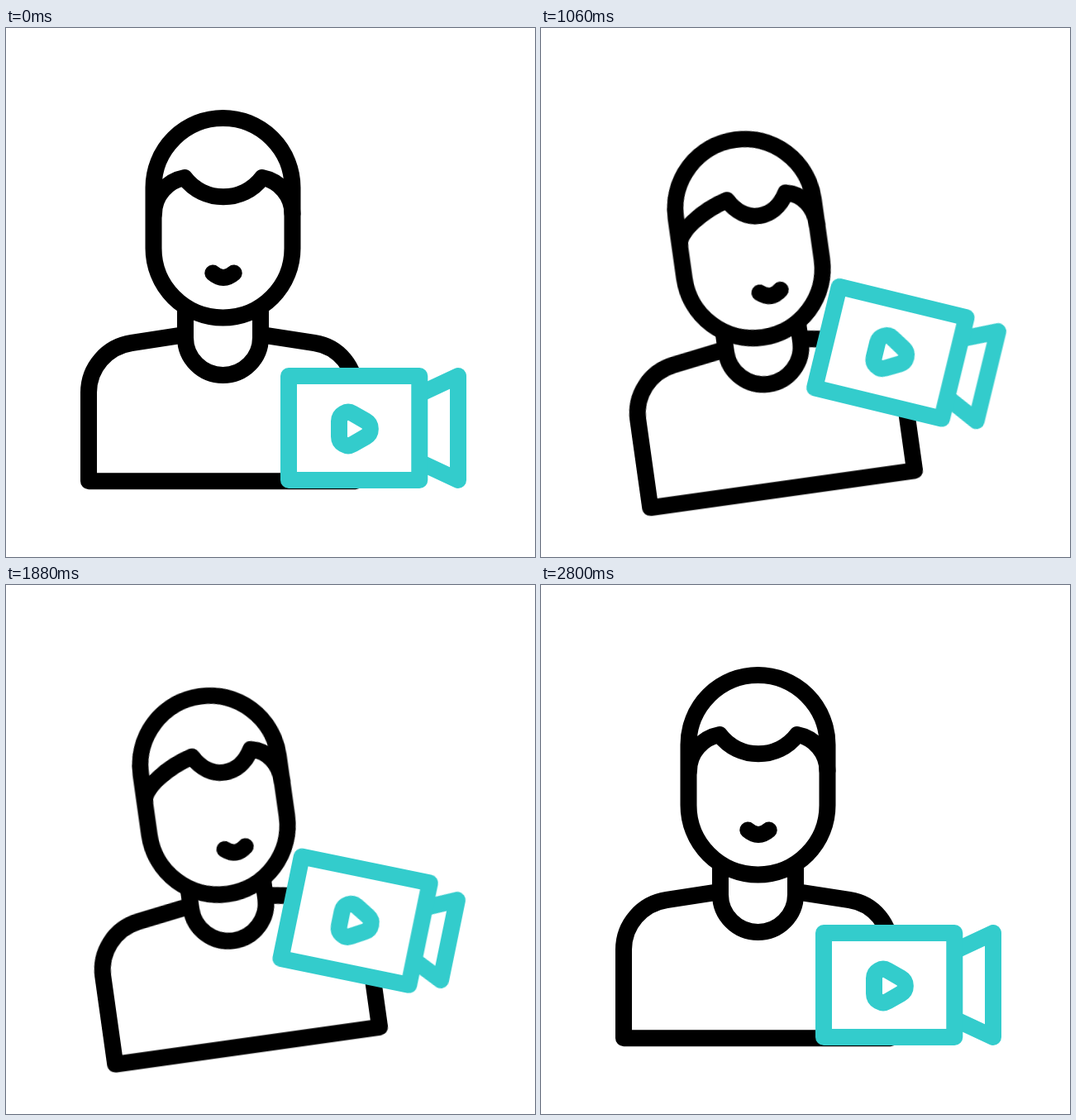
An HTML page for the animation above (2820 ms loop, 640 px wide and 640 px high).

```html
<!DOCTYPE html>
<html lang="en">
<head>
<meta charset="utf-8">
<title>Person with video camera</title>
<style>
  @property --size { syntax: "<number>"; inherits: false; initial-value: 1; }
  @property --from { syntax: "<length>"; inherits: true; initial-value: 0px; }
  @property --to { syntax: "<length>"; inherits: true; initial-value: 0px; }

  html, body { margin: 0; width: 100%; height: 100%; overflow: hidden; background: #fff; }
  svg { display: block; width: 100%; height: 100%; }

  svg * {
    animation: 2820ms cubic-bezier(.3333, 0, .6667, 1) infinite;
  }
  path, rect, line {
    fill: none;
    stroke: #000;
    stroke-width: 20px;
    stroke-linecap: round;
    stroke-linejoin: round;
  }
  .solid { fill: #fff; }
  .teal * { stroke: #3cc; }

  .bob { animation-name: bob; }
  .person { animation-name: lean; transform-origin: 266px 328px; }
  .head { animation-name: sink; }
  .hair { animation-name: hair; }
  .mouth { animation-name: mouth; }
  .camera { animation-name: lift; transform-origin: 421px 484px; }

  .lens, .play {
    transform: scale(var(--size));
    stroke-width: calc(20px / var(--size));
  }
  .lens { animation-name: lens; transform-origin: 500px 484px; }
  .play { animation-name: play; transform-origin: 422px 485px; }

  .rays {
    animation-name: ray-to, ray-from, ray-show;
    animation-timing-function: cubic-bezier(.3333, 0, .6667, 1), cubic-bezier(.3333, 0, .6667, 1), step-end;
  }
  .rays line {
    stroke-dasharray: calc(var(--to) - var(--from)) 900px;
    stroke-dashoffset: calc(-1 * var(--from));
  }

  @keyframes bob {
    0%, 21.277%, 49.645%, 78.014%, 100% { transform: translateY(0); }
    35.461%, 63.83% { transform: translateY(12px); }
  }
  @keyframes lean {
    0%, 99.291%, 100% { transform: rotate(0deg); }
    21.277%, 78.014% { transform: rotate(-8deg); }
  }
  @keyframes sink {
    0%, 99.291%, 100% { transform: translate(0, 0); }
    21.277%, 78.014% { transform: translate(.9px, 12.6px); }
  }
  @keyframes mouth {
    0%, 99.291%, 100% { transform: translateX(0); }
    21.277%, 78.014% { transform: translateX(16px); }
  }
  @keyframes hair {
    0%, 99.291%, 100% {
      d: path("M179 225 C179 203 195 185 216 181 C239 212 287 212 310 181 C331 185 346.5 203 346.5 225");
    }
    21.277%, 78.014% {
      d: path("M179 225 C179 210 212 188 242.7 180 C260.5 212 296.5 212 314.3 181 C334 185 346.5 203 346.5 225");
    }
  }
  @keyframes lift {
    0%, 99.291%, 100% { transform: translate(0, 0) rotate(0deg); }
    49.645% { transform: translate(2px, -107px) rotate(16deg); }
  }
  @keyframes lens {
    0%, 47.872%, 49.645%, 97.518%, 100% { --size: 1; }
    24.823%, 74.468% { --size: .72; }
  }
  @keyframes play {
    0%, 31.915%, 49.645%, 81.56%, 100% { --size: 1; }
    10.638%, 60.284% { --size: .444; }
    21.277%, 70.922% { --size: 1.28; }
  }
  @keyframes ray-to {
    0%, 21.277%, 35.47%, 49.645%, 63.84%, 100% { --to: 0px; }
    30.733%, 35.46%, 59.102%, 63.83% { --to: 100px; }
  }
  @keyframes ray-from {
    0%, 26.005%, 35.47%, 54.374%, 63.84%, 100% { --from: 0px; }
    35.46%, 63.83% { --from: 100px; }
  }
  @keyframes ray-show {
    0%, 35.455%, 63.825%, 100% { visibility: hidden; }
    21.277%, 49.645% { visibility: visible; }
  }
</style>
</head>
<body>
<svg viewBox="0 0 640 640">
  <g class="bob">
    <g class="person">
      <path d="M217 371 L152 381 C122 385.5 100 411 100 441 V548.2 H423 V441 C423 411 403 385.5 373 381 L308 371"/>
      <path class="solid" d="M217 335 V374.5 A45.5 45.5 0 0 0 308 374.5 V335"/>
      <g class="head">
        <rect class="solid" x="178.5" y="109" width="168" height="241.5" rx="84"/>
        <path class="hair" d="M179 225 C179 203 195 185 216 181 C239 212 287 212 310 181 C331 185 346.5 203 346.5 225"/>
        <path class="mouth" d="M250.3 296.5 Q263 307.5 275.7 296.5"/>
      </g>
    </g>
    <g class="rays teal">
      <line pathLength="100" x1="370.5" y1="238" x2="383" y2="206.4"/>
      <line pathLength="100" x1="382" y1="246.9" x2="411.3" y2="225.4"/>
      <line pathLength="100" x1="383" y1="260.9" x2="422" y2="262.7"/>
    </g>
  </g>
  <g class="camera teal">
    <path class="lens" d="M500 443 L547 421 V547 L500 525"/>
    <rect class="solid" x="342" y="421" width="158.3" height="126"/>
    <path class="play" d="M403 475.8 A11 11 0 0 1 419.5 466.3 L435.4 475.5 A11 11 0 0 1 435.4 494.5 L419.5 503.7 A11 11 0 0 1 403 494.2 Z"/>
  </g>
</svg>
</body>
</html>
```
